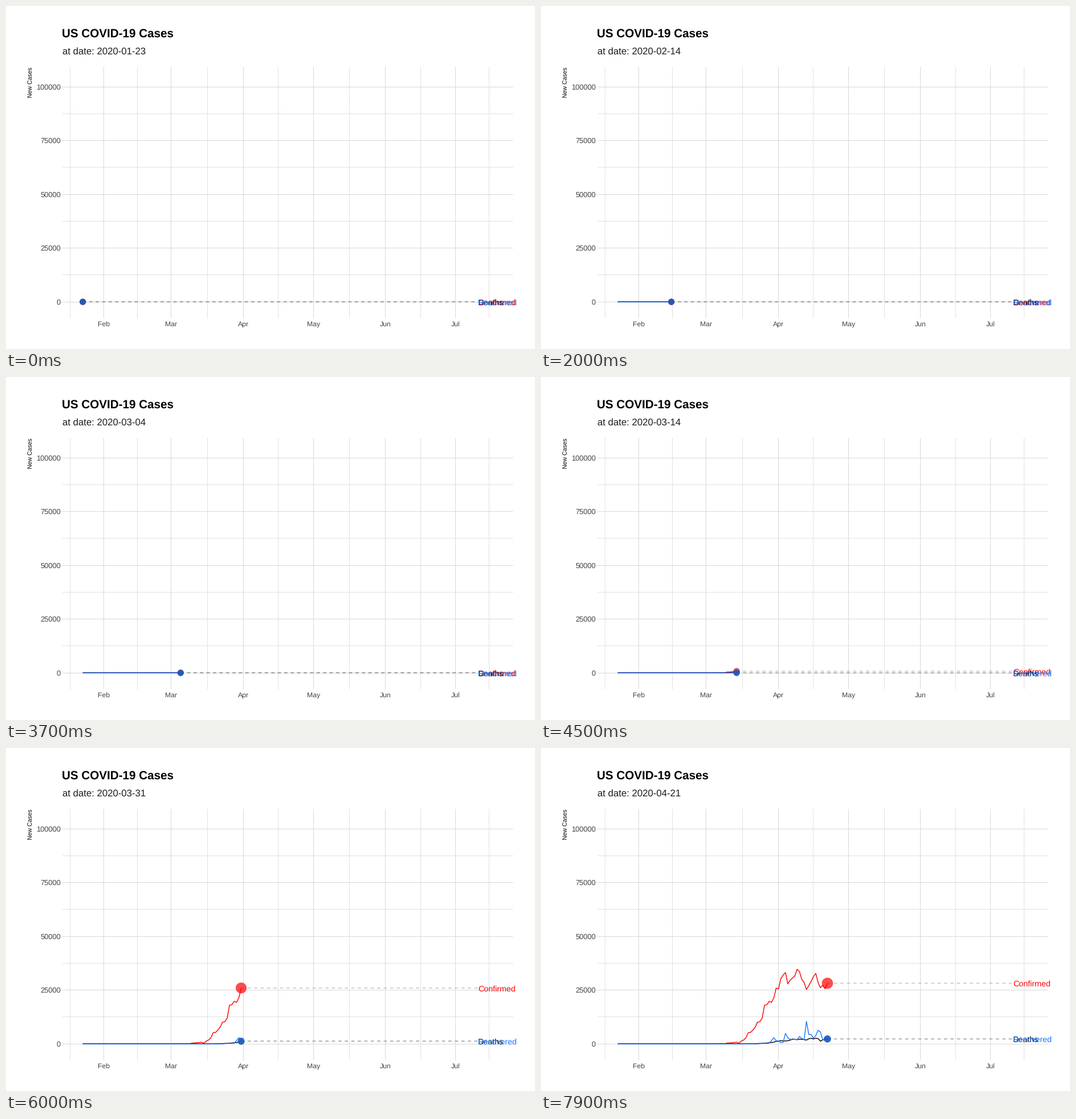
Recreate the animation shown at these times as a matplotlib script. Size 928 px wide and 603 px high, loop 8 s.

```python
import numpy as np
import matplotlib.pyplot as plt
from matplotlib.animation import FuncAnimation
from matplotlib.collections import LineCollection
from matplotlib.patches import Circle

plt.rcParams.update({
    "font.family": "Liberation Sans",
    "text.hinting": "no_hinting",
})

W, H, DPI = 928, 603, 72
FRAMES, INTERVAL = 80, 100
STEP = 169 / 149            # days per frame
START = np.datetime64("2020-01-23")
DAYS = 91
LABEL_X = 828
LINE_W = 1.42
LEFT, RIGHT, TOP, BOTTOM = 99, 889.5, 107, 549


def px(day):
    return 134.7 + 4.086 * day


def py(value):
    return 520.1 - value * 94.45 / 25000


def radius(value):
    return 3.84 + 0.0341 * np.sqrt(value + 2385)


def series(hundreds):
    """Daily counts: the given hundreds at the end, zero before."""
    out = np.zeros(DAYS)
    out[-len(hundreds):] = np.array(hundreds) * 100
    return out


confirmed = series([
    0.5, 0.7, 1, 1, 1, 3.7, 4, 5, 6.5, 7.5, 2.5, 13, 17.5, 28, 52, 53, 64,
    78, 101, 103, 120, 180, 182, 198, 193, 214, 260, 255, 304, 320, 332, 279,
    296, 307, 316, 347, 336, 300, 285, 253, 271, 291, 313, 328, 285, 261,
    273, 256, 282])
deaths = series([
    0.5, 0.6, 0.8, 1, 1.4, 2, 2.5, 3, 4, 5.5, 6, 8, 11.5, 12, 15.3, 13.2,
    13.3, 14.5, 17, 22.5, 20.5, 20, 21.5, 21, 19.5, 17.5, 23.5, 26, 22.5,
    26, 24.5, 12.5, 18.5, 23, 22.7])
recovered = series([
    1, 2, 2.5, 2.5, 3, 15, 29, 13.8, 13.5, 5.5, 7, 49, 27.5, 21, 20, 21,
    18.5, 34.4, 25, 20, 104.5, 44, 43.5, 26.5, 38.4, 63, 55, 20, 19, 23])

groups = [
    ("Confirmed", "#ff0000", confirmed),
    ("Deaths", "#000000", deaths),
    ("Recovered", "#1a75ff", recovered),
]

fig = plt.figure(figsize=((W + 0.001) / DPI, (H + 0.001) / DPI), dpi=DPI,
                 facecolor="white")
ax = fig.add_axes([0, 0, 1, 1])
ax.set_xlim(0, W)
ax.set_ylim(H, 0)
ax.axis("off")


def grid(xs, ys, color):
    xs, ys = (np.floor(v) + 0.5 for v in (xs, ys))
    segs = [[(x, TOP), (x, BOTTOM)] for x in xs]
    segs += [[(LEFT, y), (RIGHT, y)] for y in ys]
    lines = LineCollection(segs, colors=color, linewidths=1, zorder=1)
    lines.set_snap(False)
    ax.add_collection(lines)


def text(x, y, s, size, color="#000000", va="baseline", **kw):
    return ax.text(x, y, s, fontsize=size, color=color, va=va, **kw)


months = px(np.array([9, 38, 69, 99, 130, 160]))
mids = (months[1:] + months[:-1]) / 2
half = mids[0] - months[0]
minor_x = np.r_[months[0] - half, mids, months[-1] + half]
ticks = np.arange(0, 100001, 25000)
grid(minor_x, py(ticks[:-1] + 12500), "#e1e1e1")
grid(months, py(ticks), "#d8d8d8")

for v in ticks:
    text(96, py(v) + 4.6, str(v), 12.9, "#444444", ha="right")
for x, name in zip(months, ["Feb", "Mar", "Apr", "May", "Jun", "Jul"]):
    text(x, 563, name, 12.3, "#444444", ha="center")

text(98, 55, "US COVID-19 Cases", 20.6, weight="bold")
subtitle = text(98.5, 85, "", 16.7, "#1c1c1c")
text(43, 134.3, "New Cases", 10.5, rotation=90, ha="center", va="center")

parts = []
for i, (name, color, data) in enumerate(groups):
    line, = ax.plot([], [], color=color, lw=LINE_W, zorder=2 + i / 10,
                    solid_joinstyle="round", solid_capstyle="butt")
    dash, = ax.plot([], [], color="#808080", alpha=0.5, lw=LINE_W,
                    ls=(0, (4, 4)), dash_capstyle="butt", zorder=3)
    dot = ax.add_patch(Circle((0, 0), 1, fc=color, lw=0, alpha=0.7,
                              zorder=4 + i / 10))
    label = text(LABEL_X, 0, name, 14.2, color, zorder=5 + i / 10)
    line.set_snap(False)
    dash.set_snap(False)
    parts.append((data, line, dash, dot, label))


def draw(frame):
    day = int(STEP * (frame + 0.5))
    date = START + np.timedelta64(int(STEP * frame), "D")
    subtitle.set_text(f"at date: {date}")
    xs = px(np.arange(day + 1))
    for data, line, dash, dot, label in parts:
        value = data[day]
        y = py(value)
        line.set_data(xs, py(data[:day + 1]))
        dash.set_data([xs[-1], LABEL_X], [y, y])
        dot.set(center=(xs[-1], y), radius=radius(value))
        label.set_y(y + 5.6)
    return []


anim = FuncAnimation(fig, draw, frames=FRAMES, interval=INTERVAL,
                     repeat=True, repeat_delay=0, blit=False)
plt.show()
```
